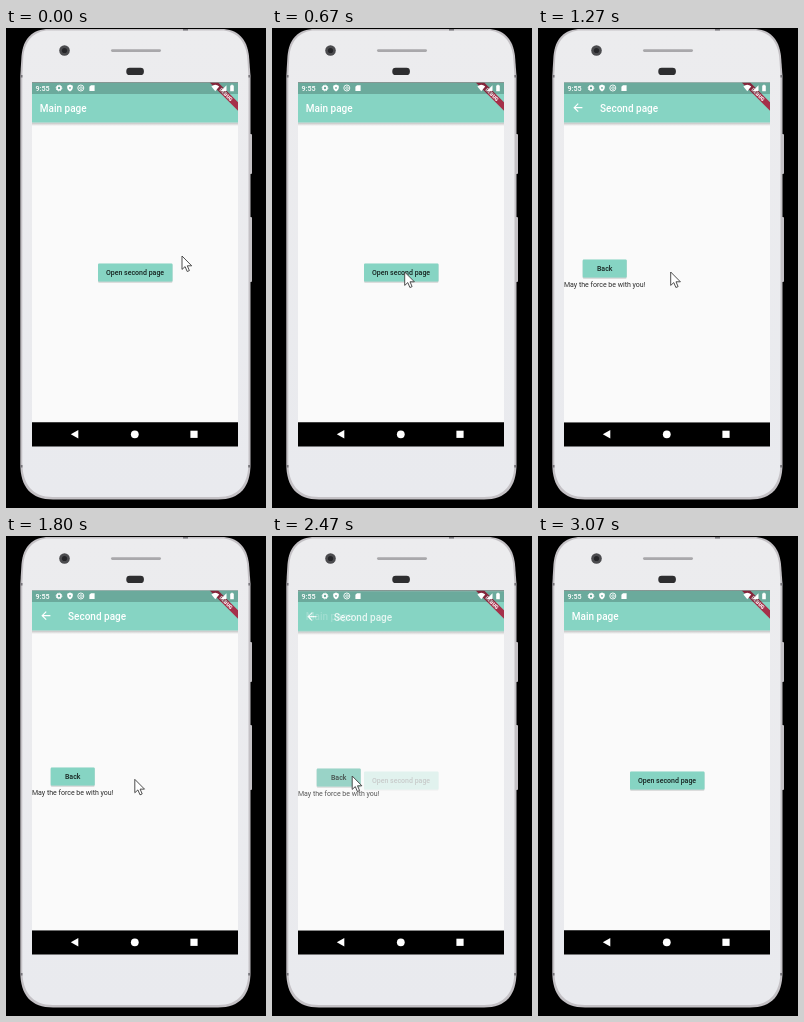
Recreate the animation shown at these times as an HTML page. Size 260x480 px, loop 3540 ms.

```html
<!DOCTYPE html>
<html lang="en">
<head>
<meta charset="utf-8">
<title>Page navigation</title>
<style>
  html, body { margin: 0; width: 100%; height: 100%; overflow: hidden; background: #000; }
  svg { display: block; width: 260px; height: 480px; }
  text { font-family: Roboto, "Noto Sans", sans-serif; }
  .title { font-size: 10px; font-weight: 500; fill: #fff; }
  .label { font-size: 7px; font-weight: 500; fill: #000; fill-opacity: .84; text-anchor: middle; }
  .body { font-size: 7px; fill: #000; fill-opacity: .84; }
  .teal { fill: #86d4c3; }
</style>
</head>
<body>
<svg viewBox="0 0 260 480" xmlns="http://www.w3.org/2000/svg">
  <defs>
    <clipPath id="view"><rect x="26" y="54" width="206" height="340"/></clipPath>
    <linearGradient id="drop" x1="0" y1="0" x2="0" y2="1">
      <stop offset="0" stop-color="#000" stop-opacity=".24"/>
      <stop offset="1" stop-color="#000" stop-opacity="0"/>
    </linearGradient>
    <linearGradient id="shell" x1="0" y1="0" x2="0" y2="1">
      <stop offset="0" stop-color="#ececee"/>
      <stop offset="1" stop-color="#e9eaee"/>
    </linearGradient>
    <filter id="soft" x="-20%" y="-40%" width="140%" height="190%">
      <feDropShadow dx="0" dy="0.8" stdDeviation="0.7" flood-color="#000" flood-opacity=".3"/>
    </filter>
    <g id="bar">
      <rect x="26" y="54" width="206" height="340" fill="#fafafa"/>
      <rect x="26" y="94" width="206" height="3.5" fill="url(#drop)"/>
      <rect class="teal" x="26" y="54" width="206" height="40"/>
    </g>
  </defs>

  <rect width="260" height="480" fill="#000"/>

  <!-- phone -->
  <g fill="#c4c1c5">
    <rect x="242" y="106" width="4" height="40" rx="1"/>
    <rect x="242" y="189" width="4" height="65" rx="1"/>
  </g>
  <path d="M14.3 48 L15.5 28 C17 11 26 1 43 1 H215 C232 1 241 11 243 28 L244.5 48 V436 C244.5 459 234 471.5 212 471.5 H47 C25 471.5 14.3 459 14.3 436 Z"
        fill="#c4c1c5"/>
  <path d="M16.3 48 L17.3 29 C18.5 13 28 2.5 43 2.5 H215 C230 2.5 239.5 13 241.2 29 L242.5 48 V434 C242.5 456 233 469 212 469 H47 C26 469 16.3 456 16.3 434 Z"
        fill="url(#shell)"/>
  <g fill="#77757a">
    <rect x="14.5" y="47" width="2" height="2.5"/>
    <rect x="242.4" y="47" width="2" height="2.5"/>
    <rect x="14.5" y="437" width="2" height="2.5"/>
    <rect x="242.2" y="437" width="2" height="2.5"/>
    <rect x="177" y="1" width="5" height="1.5"/>
  </g>
  <circle cx="58.5" cy="22.5" r="5.3" fill="#4b4b4e"/>
  <circle cx="58.5" cy="22.5" r="2.6" fill="#252528"/>
  <rect x="105" y="21.3" width="50" height="2.6" rx="1.3" fill="#a9a8ab"/>
  <rect x="120.3" y="39.7" width="17.6" height="7.4" rx="3.4" fill="#2e2e30"/>

  <g transform="translate(0 .5)">
    <rect x="26" y="54" width="206" height="364" fill="#000"/>

    <!-- pages -->
    <g clip-path="url(#view)">
      <use href="#bar"/>
      <text class="title" x="33.8" y="83.2">Main page</text>
      <rect class="teal" x="92" y="235" width="74.5" height="18" rx="1" filter="url(#soft)"/>
      <text class="label" x="129" y="246.4">Open second page</text>

      <g id="second">
        <use href="#bar"/>
        <path d="M44.4 79.2 H36.8 M40.2 75.2 L36.2 79.2 L40.2 83.2" fill="none" stroke="#fff" stroke-width="1.2"/>
        <text class="title" x="62" y="83.2">Second page</text>
        <rect class="teal" x="44.7" y="231" width="44" height="18" rx="1" filter="url(#soft)"/>
        <rect id="press" x="44.7" y="231" width="44" height="18" rx="1" fill="#000" opacity="0"/>
        <text class="label" x="66.7" y="242.4">Back</text>
        <text class="body" x="26" y="258.1">May the force be with you!</text>
      </g>

      <path d="M203.7 54 H212.2 L232 73.8 V82.3 Z" fill="#a5304a"/>
      <text transform="translate(220 66) rotate(45)" y="1.8" text-anchor="middle"
            font-size="5.1" font-weight="900" fill="#fff">DEBUG</text>
    </g>

    <!-- status bar -->
    <rect x="26" y="54" width="206" height="11.5" fill="#000" fill-opacity=".2"/>
    <g fill="#fff">
      <text x="29.5" y="62.2" font-size="7.2" font-weight="500">9:55</text>
      <circle cx="53" cy="59.5" r="2" fill="none" stroke="#fff" stroke-width="1.6"/>
      <circle cx="53" cy="59.5" r="2.9" fill="none" stroke="#fff" stroke-width=".8" stroke-dasharray="1.2 1.08"/>
      <path d="M64 56.1 L66.8 57.2 V59.5 Q66.6 61.9 64 62.9 Q61.4 61.9 61.2 59.5 V57.2 Z"/>
      <circle cx="64" cy="59.4" r=".9" fill="#6baa9c"/>
      <circle cx="74.8" cy="59.5" r="3" fill="none" stroke="#fff" stroke-width=".9"/>
      <circle cx="75" cy="59.6" r="1.3" fill="none" stroke="#fff" stroke-width=".8"/>
      <path d="M85 56.7 H88.6 V62.5 H83.4 V58.3 Z"/>
      <path d="M205.4 57.9 Q209.3 54.7 213.2 57.9 L209.3 62.7 Z"/>
      <path d="M220.5 56.7 V62.5 H214.7 Z"/>
      <path d="M224.2 57.1 H225.2 V56.3 H226.8 V57.1 H227.8 V62.7 H224.2 Z"/>
    </g>

    <!-- navigation bar -->
    <g fill="#fff">
      <path d="M64.8 405.8 L72.3 401.6 V410 Z"/>
      <circle cx="128.8" cy="405.8" r="3.9"/>
      <rect x="184.4" y="402.2" width="7.2" height="7.2"/>
    </g>
  </g>

  <path id="cursor" d="M0 0 V13.4 L3.1 10.6 L5.2 15.5 L7.4 14.6 L5.3 9.8 H9.7 Z"
        fill="#fff" stroke="#3c3c3c" stroke-width=".9" stroke-linejoin="round"/>
</svg>

<script>
  const LOOP = 3540, STEP = 200 / 3, RISE = 85;
  const second = document.getElementById("second");
  const press = document.getElementById("press");
  const cursor = document.getElementById("cursor");

  const clamp = v => Math.min(1, Math.max(0, v));
  const smooth = v => v * v * (3 - 2 * v);
  const mix = (a, b, p) => a + (b - a) * p;

  function bezier(x1, y1, x2, y2) {
    const at = (a, b, s) => 3 * a * s * (1 - s) ** 2 + 3 * b * s * s * (1 - s) + s ** 3;
    return x => {
      let lo = 0, hi = 1;
      for (let i = 0; i < 24; i++) {
        const mid = (lo + hi) / 2;
        if (at(x1, x2, mid) < x) lo = mid; else hi = mid;
      }
      return at(y1, y2, (lo + hi) / 2);
    };
  }
  const slideCurve = bezier(.4, 0, .2, 1);
  const fadeCurve = bezier(.42, 0, 1, 1);

  // step, x, y, ease for the move that ends here
  const stops = [
    [1, 176, 228],
    [10, 132.7, 244, smooth],
    [26, 132.7, 244],
    [32, 80.2, 240, smooth],
    [37, 80.2, 240],
    [38, 88, 243.5],
    [39, 102.3, 248],
    [45, 178, 258]
  ];

  function pointer(k) {
    const i = stops.findIndex(s => s[0] >= k);
    if (i <= 0) return stops[0].slice(1, 3);
    const [k0, x0, y0] = stops[i - 1];
    const [k1, x1, y1, ease] = stops[i];
    const p = (k - k0) / (k1 - k0);
    return [mix(x0, x1, ease ? ease(p) : p), mix(y0, y1, p)];
  }

  // 0: main page only, 1: second page fully open
  function openness(t) {
    if (t < 1060) return 0;
    if (t < 2400) return clamp(.6 + (t - 1066) / 300);
    return clamp(1 - (t - 2432) / 253);
  }

  function draw(time) {
    const k = Math.floor((time % LOOP + 5) / STEP);
    const t = k * STEP;
    const v = openness(t);
    second.setAttribute("display", v > 0 ? "inline" : "none");
    second.setAttribute("opacity", v >= 1 ? 1 : fadeCurve(v));
    second.setAttribute("transform", `translate(0 ${v >= 1 ? 0 : RISE * (1 - slideCurve(v))})`);
    press.setAttribute("opacity", k >= 36 ? .05 : 0);

    const shown = k <= 45;
    cursor.setAttribute("display", shown ? "inline" : "none");
    if (shown) cursor.setAttribute("transform", `translate(${pointer(k).join(" ")})`);
  }

  const start = performance.now();
  function tick() {
    draw(performance.now() - start);
    requestAnimationFrame(tick);
  }
  tick();
</script>
</body>
</html>
```
